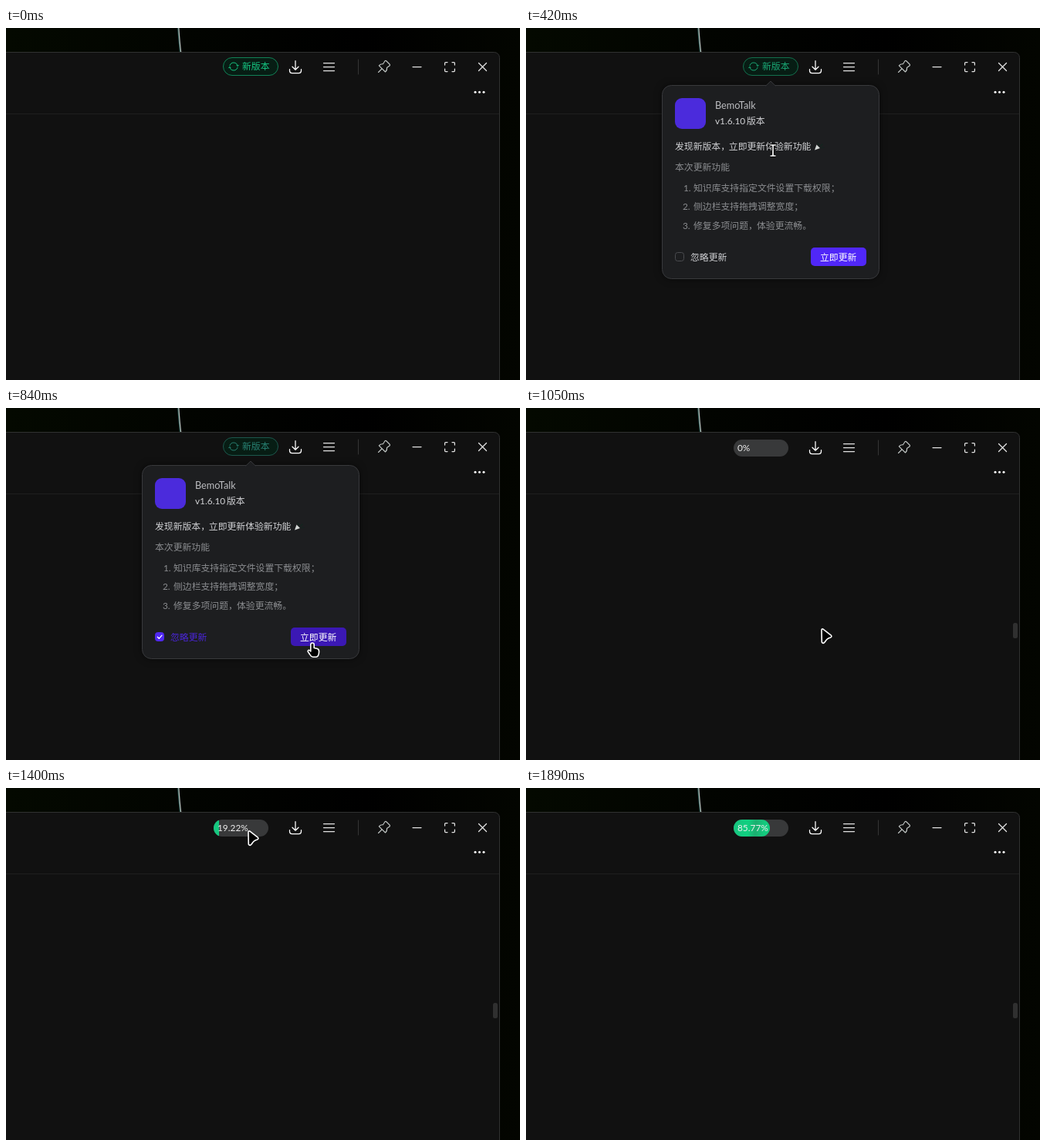
An HTML page that plays this animation: 666x457 px, repeating every 1.95 s.

```html
<!DOCTYPE html>
<html lang="zh-CN">
<head>
<meta charset="utf-8">
<style>
html, body { margin: 0; width: 666px; height: 457px; overflow: hidden; background: #020300; }
svg { display: block; }
text { font: 11.85px Lato, "Noto Sans CJK SC", "Noto Sans CJK", sans-serif; stroke: none; white-space: pre; }
.line { fill: none; stroke-width: 1.25; stroke-linecap: round; stroke-linejoin: round; }
.soft { fill: #8b8d90; }
.bright { fill: #d0d1d4; }
#panel { filter: drop-shadow(0 0 5px #0008); }
#cursor path { fill: #000; stroke: #fff; stroke-width: 1.6; stroke-linejoin: round; }
</style>
</head>
<body>
<svg width="666" height="457" viewBox="0 0 666 457">
  <defs>
    <linearGradient id="desk"><stop stop-color="#040900"/><stop offset=".35" stop-color="#020400"/><stop offset=".7" stop-color="#000"/><stop offset="1" stop-color="#030500"/></linearGradient>
    <linearGradient id="fill" gradientUnits="userSpaceOnUse" x1="269" x2="316" y1="50" y2="54">
      <stop stop-color="#18c580"/><stop offset=".4" stop-color="#10d080"/><stop offset=".6" stop-color="#1cae70"/><stop offset=".85" stop-color="#13cb7e"/>
    </linearGradient>
    <clipPath id="track"><rect x="269" y="41" width="71" height="22" rx="11"/></clipPath>
  </defs>

  <rect width="666" height="457" fill="url(#desk)"/>
  <path d="M222.8 0Q224 18 225.6 32" fill="none" stroke="#28544d" stroke-width="1.4"/>
  <path d="M223.8 0Q225 18 226.7 32" fill="none" stroke="#b4bdba" stroke-width="1.3"/>
  <rect x="-20.5" y="31.5" width="660" height="450" rx="7" fill="#111" stroke="#303131"/>
  <path d="M0 111.5H639" stroke="#1f1f1f"/>

  <g id="tools" class="line" stroke="#e4e4e4">
    <path d="M375 42.5V54M371 50.2L375 54.2L379 50.2M367.5 53.5V55.5Q367.5 58.5 370.5 58.5H379.5Q382.5 58.5 382.5 55.5V53.5" stroke="#fff"/>
    <path d="M411.5 45.5H425.5M411.5 50.5H425.5M411.5 55.5H425.5"/>
    <path d="M456.5 41V60" stroke="#353535" stroke-width="1"/>
    <path d="M491 42.8Q492 42 493 43L497 47Q498 48 497 49L493.5 51.5Q494 55 491.5 57L483.3 48.8Q485.5 46.3 488.5 46.8ZM487 53L482.5 57.5" stroke="#c2c7c5" stroke-width="1.1"/>
    <path d="M527 50.5H538"/>
    <path d="M568.6 48V45.6Q568.6 44.5 569.7 44.5H572M578 44.5H580.3Q581.4 44.5 581.4 45.6V48M581.4 53V55.4Q581.4 56.5 580.3 56.5H578M572 56.5H569.7Q568.6 56.5 568.6 55.4V53"/>
    <path d="M612.5 45.5L622.5 55.5M622.5 45.5L612.5 55.5"/>
  </g>
  <g fill="#fff"><circle cx="608" cy="83.3" r="1.5"/><circle cx="613.5" cy="83.3" r="1.5"/><circle cx="619" cy="83.3" r="1.5"/></g>
  <rect id="scroll" x="631" y="279" width="6" height="20" rx="2.5" fill="#303030"/>

  <g id="badge">
    <rect id="badgeBox" x="281.5" y="38.5" width="71" height="23" rx="11.5"/>
    <g id="label">
      <path id="refresh" class="line" style="stroke-width:1" d="M290 48.6A5.3 5.3 0 0 1 300.2 49.2M300 51.4A5.3 5.3 0 0 1 289.8 50.8M298.8 48.4L300.2 49.6L301.4 48.2M288.6 51.8L289.8 50.4L291.2 51.6"/>
      <text id="badgeText" x="306" y="54.4">新版本</text>
    </g>
  </g>

  <g id="progress">
    <rect x="269" y="41" width="71" height="22" rx="11" fill="#38393a"/>
    <g clip-path="url(#track)"><rect id="bar" x="240" y="41" height="22" fill="url(#fill)"/></g>
    <text id="percent" x="274" y="56" fill="#eee"></text>
  </g>

  <g id="popup">
    <rect id="panel" x="176.5" y="74.5" width="281" height="251" rx="12" fill="#1d1e20" stroke="#38393c"/>
    <path d="M310.5 75.2L317 69L323.5 75.2" fill="#1d1e20" stroke="#38393c"/>
    <rect x="193" y="91" width="40" height="40" rx="9" fill="#4b2bdc"/>
    <g class="bright">
      <text x="245" y="105.3" style="font-size:12.7px" fill="#bcbdc0">BemoTalk</text>
      <text y="125.3"><tspan x="245">v1.6.10</tspan><tspan x="286">版本</tspan></text>
      <text y="157.8"><tspan x="193">发现新版本，</tspan><tspan x="262.8">立即更新体验新功能</tspan></text>
    </g>
    <path d="M374 158.5L376.5 151.5L381 156Z" fill="#d5d8d6"/>
    <path d="M378 149.5L379.5 151.5M381 153.5L384 151M383 155.5L385.5 155" class="line" stroke="#12261f"/>
    <g class="soft">
      <text x="193" y="184.8">本次更新功能</text>
      <text y="211.5"><tspan x="204">1.</tspan><tspan x="217">知识库支持指定文件设置下载权限；</tspan></text>
      <text y="235.8"><tspan x="203">2.</tspan><tspan x="217">侧边栏支持拖拽调整宽度；</tspan></text>
      <text y="260.6"><tspan x="203">3.</tspan><tspan x="217">修复多项问题，</tspan><tspan x="299">体验更流畅。</tspan></text>
    </g>
    <rect id="box" x="193.5" y="291.5" width="11" height="11" rx="3"/>
    <path id="tick" class="line" stroke="#fff" d="M196.3 297.2L198.3 299.3L202 295.2"/>
    <text id="skip" x="213" y="301.6">忽略更新</text>
    <rect id="button" x="369" y="285" width="72" height="24" rx="5"/>
    <text x="381" y="301.6" fill="#fff">立即更新</text>
  </g>

  <g id="cursor">
    <path id="arrow" d="M0 1.5Q0 -1 2.3 .3L12 7.8Q14 9.8 11.5 11Q7 12 4.5 16.5Q2 20 .3 17Z"/>
    <path id="hand" d="M-2.2 2.2A2.2 2.2 0 0 1 2.2 2.2V6.5L6.5 7.5Q8.8 8.5 8.6 11.5Q8.4 17.5 5 18.3H.8Q-1.8 18-3.3 15L-5.8 11.2Q-6 8.8-3.8 9.5L-2.2 11Z"/>
    <g id="beam" fill="none"><path d="M-3.5-7H3.5M0-7V7M-3.5 7H3.5" style="stroke:#000;stroke-width:4"/><path d="M-3.5-7H3.5M0-7V7M-3.5 7H3.5" style="stroke-width:1.7"/></g>
  </g>
</svg>
<script>
const LOOP = 1950, STEP = 70;
const $ = id => document.getElementById(id);
const set = (id, attrs) => { for (const k in attrs) $(id).setAttribute(k, attrs[k]); };
const show = (id, on) => set(id, { opacity: +on });
const clamp = v => Math.max(0, Math.min(1, v));

// time, x, y of the pointer's hot spot
const route = [
  [70, 350, 2], [210, 330, 38], [280, 326, 48], [350, 323, 90], [420, 320, 159],
  [630, 200, 296], [700, 200, 296], [840, 397, 305], [910, 397, 305], [1120, 376, 278],
  [1330, 320, 72], [1400, 314, 56], [1470, 318, 76], [1680, 400, 462]
];
// time, red, green, blue of the badge label
const glow = [[0, 22, 201, 132], [420, 26, 170, 118], [840, 40, 130, 115], [1950, 40, 130, 115]];

function along(keys, t) {
  const i = Math.max(1, keys.findIndex(k => k[0] >= t));
  const a = keys[i - 1], b = keys[i], p = clamp((t - a[0]) / (b[0] - a[0]));
  return a.slice(1).map((v, j) => v + (b[j + 1] - v) * p);
}

function pointerKind(t) {
  if (t >= 210 && t < 350 || t >= 560 && t < 735 || t >= 800 && t < 980) return 'hand';
  return t >= 400 && t < 560 ? 'beam' : 'arrow';
}

function draw(t) {
  const loading = t >= 980, hover = t >= 210 && t < 350;
  const checked = t >= 700, pressed = t >= 800;

  const label = hover ? '#fff' : `rgb(${along(glow, t)})`;
  show('badge', !loading);
  set('badgeBox', {
    fill: hover ? '#10dc86' : '#071d14',
    stroke: hover ? '#10dc86' : label,
    'stroke-opacity': hover ? 1 : .6
  });
  set('refresh', { stroke: label });
  set('badgeText', { fill: label });

  set('popup', { opacity: t < 700 ? clamp((t - 300) / 120) : clamp((1050 - t) / 120) });
  set('box', { fill: checked ? '#5028f0' : '#1d1e20', stroke: checked ? '#5028f0' : '#4b4c50' });
  show('tick', checked);
  set('skip', { fill: checked ? '#4a25d8' : '#cfd0d3' });
  set('button', { fill: pressed ? '#3b18b4' : '#5027f8' });

  show('progress', loading);
  set('tools', { transform: `translate(0 ${loading ? 1 : 0})` });
  show('scroll', t >= 1050);
  const done = Math.max(0, 19.22 + (t - 1400) * 66.55 / 490);
  const width = Math.max(0, 7 + (t - 1400) * 40 / 490);
  $('percent').textContent = done ? done.toFixed(2) + '%' : '0%';
  set('bar', { width: 29 + width, rx: Math.min(11, width / 4) });

  const kind = pointerKind(t);
  show('cursor', t >= 70 && t < 1680);
  set('cursor', { transform: `translate(${along(route, Math.min(t, 1680))})` });
  for (const id of ['arrow', 'hand', 'beam']) show(id, id === kind);
}

function tick() {
  draw(Math.floor(performance.now() % LOOP / STEP) * STEP);
  requestAnimationFrame(tick);
}
tick();
</script>
</body>
</html>
```
